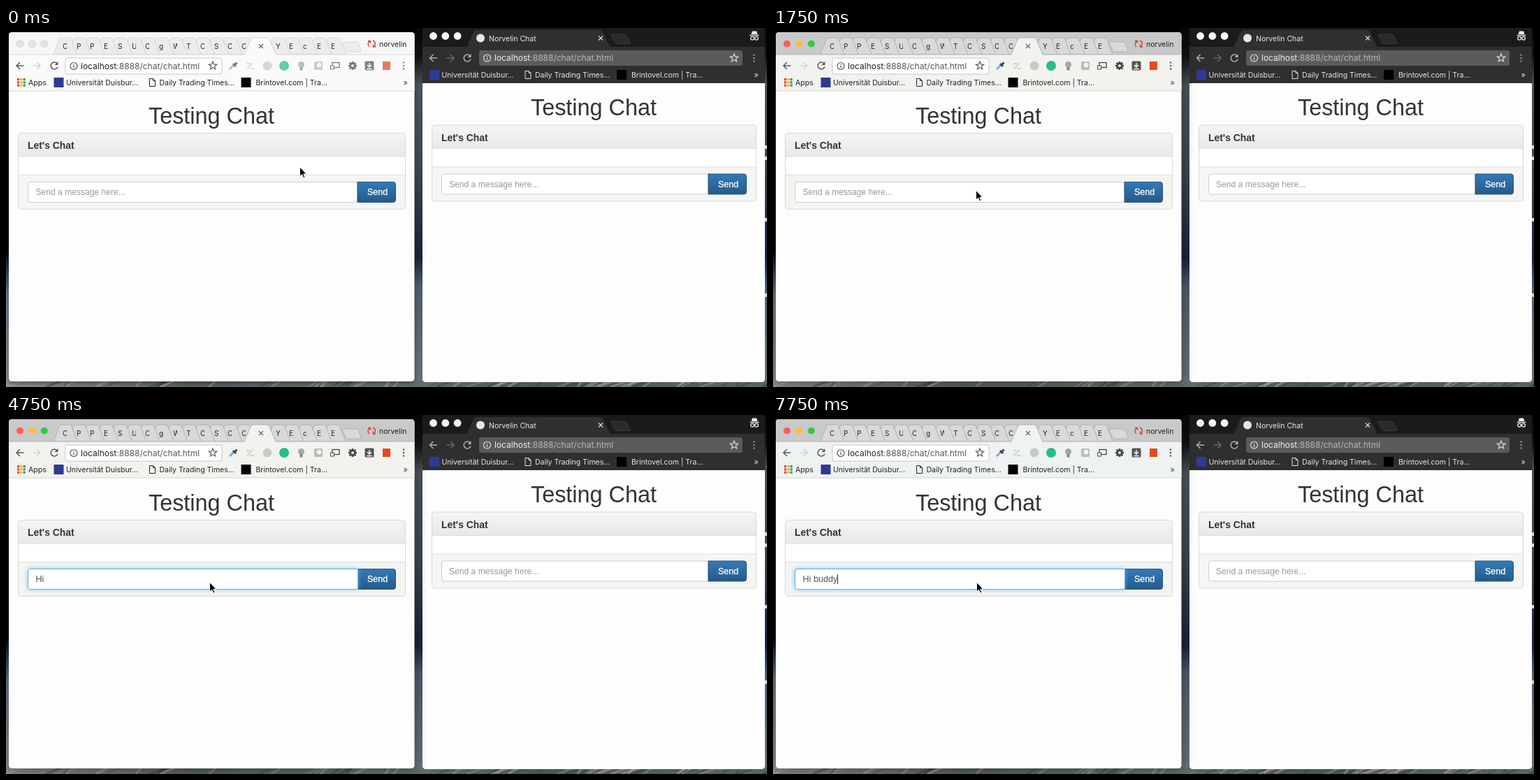
An HTML page for the animation above (8 s loop, 1089 by 514 pixels).

```html
<!DOCTYPE html>
<html lang="en">
<head>
<meta charset="utf-8">
<title>Testing Chat</title>
<style>
  html, body { margin: 0; width: 100%; height: 100%; overflow: hidden; background: #000; }
  svg { display: block; width: 100vw; height: 100vh;
    --strip: #f6f6f6; --tab: #ececec; --bar: #fafafa; --foot: #f5f5f5; --edge: #cfcfcf; --icons: .72; --shadow: 3px; }
  svg.active { --strip: #c9c9c9; --tab: #d9d9d9; --bar: #f2f2ee; --foot: #f4f5f1; --edge: #a9a9a9; --icons: 1; --shadow: 9px; }
  svg.cool { --bar: #eff2f2; --foot: #f1f4f5; }
  text { white-space: pre; }
  .ui { font-family: Inter, Roboto, sans-serif; }
  .page { font-family: "Liberation Sans", Arial, sans-serif; }
  .strip { fill: var(--strip); }
  .tab { fill: var(--tab); stroke: var(--edge); stroke-width: .8; }
  .bar { fill: var(--bar); }
  .icons { opacity: var(--icons); }
  #left { filter: drop-shadow(0 3px var(--shadow) rgba(0, 0, 0, .4)); }
  #left .foot { fill: var(--foot); }
  #right .foot { fill: #f5f5f5; }
  #glow { filter: drop-shadow(0 0 3px rgba(102, 175, 233, .75)); }
</style>
</head>
<body>
<svg id="stage" viewBox="0 0 1089 514" preserveAspectRatio="none">
  <defs>
    <linearGradient id="sky" x2="0" y2="1">
      <stop stop-color="#050607"/><stop offset=".08" stop-color="#101316"/>
      <stop offset=".16" stop-color="#4d5458"/><stop offset=".4" stop-color="#3c464e"/>
      <stop offset=".64" stop-color="#17243a"/><stop offset=".72" stop-color="#4c5c6c"/>
      <stop offset="1" stop-color="#697275"/>
    </linearGradient>
    <linearGradient id="dark" x2="0" y2="1">
      <stop offset=".62" stop-color="#000"/><stop offset=".66" stop-color="#1c3354"/>
      <stop offset=".74" stop-color="#6d7b88"/><stop offset="1" stop-color="#8b9092"/>
    </linearGradient>
    <linearGradient id="ground">
      <stop stop-color="#8a9093"/><stop offset=".25" stop-color="#596268"/>
      <stop offset=".5" stop-color="#687377"/><stop offset=".7" stop-color="#4b5752"/>
      <stop offset="1" stop-color="#59655f"/>
    </linearGradient>
    <linearGradient id="heading" x2="0" y2="1">
      <stop stop-color="#f5f5f5"/><stop offset="1" stop-color="#e8e8e8"/>
    </linearGradient>
    <linearGradient id="button" x2="0" y2="1">
      <stop stop-color="#337ab7"/><stop offset="1" stop-color="#265a88"/>
    </linearGradient>
    <clipPath id="leftShape"><rect x="4" y="6" width="580.5" height="500" rx="4.5"/></clipPath>
    <clipPath id="rightShape"><rect x="596" y="-8" width="490" height="515" rx="4.5"/></clipPath>
  </defs>
  <g id="wallpaper"></g>
  <g id="right"></g>
  <g id="left"></g>
  <g id="focus">
    <path id="glow" d="M503 220.5H35q-3.5 0-3.5 3.5v22q0 3.500 3.500 3.500H503.500V220.500Z" fill="#fff" stroke="#66afe9"/>
  </g>
  <text id="hint" class="page" x="42.500" y="239" font-size="12.100" fill="#999">Send a message here...</text>
  <text id="typed" class="page" x="42.500" y="239" font-size="12.600" fill="#555"></text>
  <rect id="caret" y="228" width="1" height="14" fill="#333"/>
  <path id="cursor" d="M0 0V13.500L3.100 10.700L5.200 15.500L7.300 14.600L5.200 9.900H9.300Z" fill="#000" stroke="#fff" stroke-width=".9"/>
</svg>
<script>
const $ = id => document.getElementById(id);
const text = (x, y, s, size, fill, more = '') =>
  `<text x="${x}" y="${y}" font-size="${size}" fill="${fill}" ${more}>${s}</text>`;
const rect = (x, y, w, h, fill, more = '') =>
  `<rect x="${x}" y="${y}" width="${w}" height="${h}" fill="${fill}" ${more}/>`;
const circle = (x, y, r, fill, more = '') => `<circle cx="${x}" cy="${y}" r="${r}" fill="${fill}" ${more}/>`;
const line = (d, stroke, width = 1.5, more = '') =>
  `<path d="${d}" fill="none" stroke="${stroke}" stroke-width="${width}" ${more}/>`;
const range = (n, f) => Array.from({ length: n }, (_, i) => f(i)).join('');

const cross = (x, y, c) => line(`M${x - 3} ${y - 3}l6 6m0-6l-6 6`, c, 1.2);
const arrow = (x, y, dir, c) => line(`M${x + 5.5 * dir} ${y}H${x - 5 * dir}m${5 * dir}-5l${-5 * dir} 5l${5 * dir} 5`, c);
const reload = (x, y, c) =>
  line(`M${x + 4} ${y - 3.3}a5 5 0 1 0 1 4.800`, c) + `<path d="M${x + 5.5} ${y - 6}v5h-5z" fill="${c}"/>`;
const dots = (x, y, c) => range(3, i => circle(x, y - 4.5 + i * 4.5, 1.3, c));
const info = (x, y, c) => circle(x, y, 5, 'none', `stroke="${c}" stroke-width="1.200"`) +
  line(`M${x} ${y - 0.8}v3.600M${x} ${y - 3}v1.300`, c, 1.3);
const sheet = (x, y, c) => line(`M${x} ${y - 5.5}h5l3 3v8h-8zm5 0v3h3`, c, 1);
function star(x, y, c) {
  const points = Array.from({ length: 10 }, (_, i) => {
    const r = i % 2 ? 2.6 : 6, a = (i / 5 - 0.5) * Math.PI;
    return `${x + r * Math.cos(a)},${y + r * Math.sin(a)}`;
  });
  return `<polygon points="${points.join(' ')}" fill="none" stroke="${c}" stroke-width="1.200"/>`;
}

function address(x, y, host, rest) {
  return text(x, y, `localhost<tspan fill="${rest}">:8888/chat/chat.html</tspan>`, 12, host);
}

function bookmarks(x, y, c) {
  return rect(x, y - 7, 14, 14, '#2d3b92') + text(x + 17.5, y + 4, 'Universität Duisbur...', 10.5, c) +
    sheet(x + 137, y, c) + text(x + 151, y + 4, 'Daily Trading Times...', 10.5, c) +
    rect(x + 268, y - 7, 14, 14, '#000') + text(x + 289, y + 4, 'Brintovel.com | Tra...', 10.5, c);
}

function chatPage(x, y, w, middle, hint) {
  const bx = x + w - 68;
  const field = `M${bx} ${y + 70}H${x + 18}q-3.500 0-3.500 3.500v22q0 3.500 3.500 3.500H${bx}Z`;
  const button = `M${bx} ${y + 70}h51q3.500 0 3.500 3.500v22q0 3.500-3.500 3.500h-51Z`;
  return `<g class="page">` +
    text(middle, y - 14, 'Testing Chat', 32.4, '#333', 'text-anchor="middle"') +
    rect(x + 0.5, y, w, 109, '#fff', 'rx="4"') +
    `<path class="foot" d="M${x + 0.5} ${y + 60}h${w}v45q0 4-4 4h${8 - w}q-4 0-4-4Z"/>` +
    `<path d="M${x + 0.5} ${y + 33.5}v-29.500q0-4 4-4h${w - 8}q4 0 4 4v29.500Z" fill="url(#heading)"/>` +
    line(`M${x} ${y + 33.5}h${w}m0 26.500h${-w}`, '#ddd', 1) +
    rect(x + 0.5, y, w, 109, 'none', 'rx="4" stroke="#d8d8d8"') +
    text(x + 14, y + 22.5, "Let's Chat", 13.9, '#333', 'font-weight="bold"') +
    `<path d="${field}" fill="#fff" stroke="#ccc"/>` +
    `<path d="${button}" fill="url(#button)" stroke="#245580"/>` +
    text(bx + 14, y + 88.5, 'Send', 12.5, '#fff', 'stroke="#fff" stroke-width=".3"') +
    (hint ? text(x + 25, y + 88.5, 'Send a message here...', 12.1, '#999') : '') + `</g>`;
}

function tab(x, letter) {
  return `<path class="tab" d="M${x} 38l8-21q1-3 3-3h12q2 0 3 3l8 21z"/>` +
    `<clipPath id="tab${x}"><rect x="${x + 13}" y="14" width="6" height="20"/></clipPath>` +
    `<g clip-path="url(#tab${x})">${text(x + 13, 30, letter, 10, '#222')}</g>`;
}

function leftWindow() {
  const before = [...'CPPESUCgWTCSCC'].map((s, i) => tab(Math.round(68 + i * 19.7), s));
  const after = [...'YEcEE'].map((s, i) => tab(Math.round(372.5 + i * 19.9), s));
  const grey = '#5a5a5a', faint = '#d2d2d2';
  const colours = ['#e5493a', '#efb42d', '#3f9d58', '#4285d6'];
  const grid = range(9, i => rect(16 + i % 3 * 4.3, 72 + (i / 3 | 0) * 4.3, 3.2, 3.2, colours[(i + (i / 3 | 0)) % 4]));
  const gear = range(8, i => `<rect x="494.800" y="48" width="2.400" height="12" fill="#444" transform="rotate(${i * 45} 496 54)"/>`);
  return `<g clip-path="url(#leftShape)" class="ui">` +
    rect(4, 6, 581, 501, '#fdfdfd') + `<rect class="strip" x="4" y="6" width="581" height="33"/>` +
    range(3, i => circle(20 + i * 17.4, 22.5, 5.3, '#e3e3e3', 'class="light" stroke="#d0d0d0" stroke-width=".6"')) +
    `<path class="tab" d="M481 21.500q-1-1.500 1-1.500h19q2 0 3 2l4 10q1 2-1 2h-18q-2 0-3-2z"/>` +
    after.reverse().join('') + before.reverse().join('') +
    `<rect class="bar" x="4" y="38" width="581" height="52"/>` + line('M4 38H585', 'var(--edge)', .8) +
    `<path class="bar" d="M341 39l9-22q1-3 3-3h21q2 0 3 3l9 22z"/>` +
    line('M341 38l9-21q1-3 3-3h21q2 0 3 3l9 21', 'var(--edge)', .8) + cross(365, 26, '#666') +
    line('M521 18.500a5 5 0 0 0-1 8.500m5-9a5 5 0 0 1 1 9M518 18.500h3.500V22M529 27h-3.500v-3.500', '#cf4437', 1.4) +
    text(534, 27, 'norvelin', 10.4, '#222') +
    line('M4 90H585', '#d5d5d5', 1) +
    arrow(20, 54, -1, grey).replace(/^/, '<g transform="rotate(180 20 54)">') + '</g>' +
    `<g transform="rotate(180 44 54)">${arrow(44, 54, 1, faint)}</g>` + reload(69, 54, grey) +
    rect(85, 43, 224, 23, '#fff', 'rx="3" stroke="#c8c8c8"') + info(97, 54.5, grey) +
    address(107, 58.5, '#222', '#555') + star(296, 54, grey) +
    `<g class="icons">` +
    line('M320 59l6-6', '#78aeda', 3) + line('M325 51l4 4M327 53l3.500-3.500', '#3d4852', 3) +
    line('M345 58l8-8M344 51h5M349 58h6', faint, 2) + circle(374, 54, 6.5, '#c9c9c9') +
    circle(398, 54, 7, '#27bd8b') +
    circle(422.5, 52.5, 4.5, '#a7a7a7') + rect(420.5, 56, 4, 4.5, '#858585') +
    rect(441, 48, 12, 12, '#b9b9b9', 'rx="2"') + circle(448, 53, 3.5, '#f2f2f2') +
    rect(467, 49.5, 10, 7, 'none', 'stroke="#444" stroke-width="1.300"') + rect(464.5, 54, 5, 5, '#fff', 'stroke="#444"') +
    gear + circle(496, 54, 4.4, '#444') + circle(496, 54, 2, '#eee') +
    rect(513.5, 47.5, 13, 13, '#555', 'rx="1.500"') + line('M520 50v6m-3-3l3 3l3-3M516.500 58.500h7', '#fff', 1.4) +
    rect(539, 48, 11, 12, '#e64a19') + dots(569, 54, grey) + `</g>` +
    grid + text(32, 82, 'Apps', 10.6, '#222') + bookmarks(68.5, 78, '#222') + text(568.5, 81.5, '»', 11, '#444') +
    chatPage(17, 150.5, 554, 294, false) + `</g>`;
}

function rightWindow() {
  const pale = '#e8e8e8', grey = '#8d8d8d';
  return `<g clip-path="url(#rightShape)" class="ui">` +
    rect(596, 0, 490, 508, '#fdfdfd') + rect(596, 0, 490, 28, '#1b1b1b') + rect(596, 27, 490, 52, '#2f2f2f') +
    range(3, i => circle(611.5 + i * 17.3, 11.5, 5.4, '#f4f4f4')) +
    `<path d="M659 28l10-22q1-3 4-3h177q3 0 4 3l11 22z" fill="#303030"/>` +
    `<path d="M866 10.500q-1-1.500 1-1.500h18q2 0 3 2l5 9.500q1 2-1 2h-18q-2 0-3-2z" fill="#2a2a2a" stroke="#393939"/>` +
    circle(679, 14.5, 6, '#e6e6e6') + text(691, 18.5, 'Norvelin Chat', 10.5, pale) + cross(851, 14.5, '#ddd') +
    `<path d="M1066.500 9l1.500-4.500h6l1.500 4.500z" fill="#eee"/>` + line('M1064.500 10.500h13', '#eee', 1.4) +
    circle(1068, 14.8, 2.4, 'none', 'stroke="#eee" stroke-width="1.200"') +
    circle(1074, 14.8, 2.4, 'none', 'stroke="#eee" stroke-width="1.200"') +
    `<g transform="rotate(180 611.500 43)">${arrow(611.5, 43, -1, '#b0b0b0')}</g>` +
    `<g transform="rotate(180 636 43)">${arrow(636, 43, 1, '#666')}</g>` + reload(660, 43, '#b0b0b0') +
    rect(677, 32, 377, 22, '#5b5b5b', 'rx="3"') + info(688.5, 43, '#ddd') +
    address(699, 47.3, '#f0f0f0', '#b8b8b8') + star(1042, 43, '#ddd') + dots(1070.5, 43, grey) +
    bookmarks(606, 67, pale) + text(1070.5, 70.5, '»', 11, '#ddd') +
    chatPage(609, 139, 464, 841, true) + `</g>`;
}

function wallpaper() {
  let seed = 7;
  const random = () => (seed = seed * 16807 % 2147483647) / 2147483647;
  const streaks = range(70, () => {
    const x = random() * 1089, length = 6 + random() * 22;
    return line(`M${x} 514l${length} -9`, random() < 0.5 ? '#aeb2b3' : '#343e45', 1 + random() * 3, 'opacity=".450"');
  });
  return rect(0, 0, 1089, 514, 'url(#sky)') + rect(0, 0, 584, 7, '#000') + rect(0, 0, 5, 514, 'url(#dark)') +
    rect(0, 505, 1089, 9, 'url(#ground)') + streaks +
    range(4, i => rect(1086, [168, 184, 272, 380][i], 3, 5, '#d5d8d8'));
}

$('wallpaper').innerHTML = wallpaper();
$('right').innerHTML = rightWindow();
$('left').innerHTML = leftWindow();
$('left').querySelectorAll('.page text').forEach(t => t.setAttribute('pointer-events', 'none'));

const lights = [...document.querySelectorAll('.light')];
const pointer = [
  [0, 420.5, 199], [250, 327, 220], [500, 289.5, 240], [750, 290, 236.5], [1000, 290.5, 232.5],
  [2250, 291, 236.5], [2500, 291.5, 239.5]
];
// time, content of the field, caret visible
const typing = [
  [0, '', 0], [2750, '', 1], [3250, '', 0], [3750, '', 1], [4000, 'H', 1], [4250, 'Hi', 1], [4750, 'Hi', 0],
  [5250, 'Hi', 1], [5500, 'Hi ', 1], [5750, 'Hi b', 1], [6000, 'Hi bu', 1], [6250, 'Hi buy', 1],
  [6750, 'Hi buy', 0], [7000, 'Hi bu', 0], [7250, 'Hi bu', 1], [7500, 'Hi bud', 1], [7750, 'Hi buddy', 1]
];
const latest = (steps, t) => steps.filter(s => s[0] <= t).pop();
const show = (id, on) => $(id).setAttribute('visibility', on ? 'visible' : 'hidden');

function draw() {
  const t = performance.now() % 8000;
  const active = t >= 1750;
  const [, px, py] = latest(pointer, t);
  const [, content, caretOn] = latest(typing, t);
  $('stage').setAttribute('class', (active ? 'active ' : '') + (t >= 7500 ? 'cool' : ''));
  lights.forEach((light, i) => light.setAttribute('fill', active ? ['#fc5b57', '#fdbc3f', '#34c84a'][i] : '#e3e3e3'));
  $('cursor').setAttribute('transform', `translate(${px} ${py})`);
  $('typed').textContent = content;
  $('caret').setAttribute('x', Math.round(42.5 + (content ? $('typed').getComputedTextLength() : 0)));
  show('caret', caretOn);
  show('hint', !content);
  show('focus', t >= 2750);
  requestAnimationFrame(draw);
}
draw();
</script>
</body>
</html>
```
